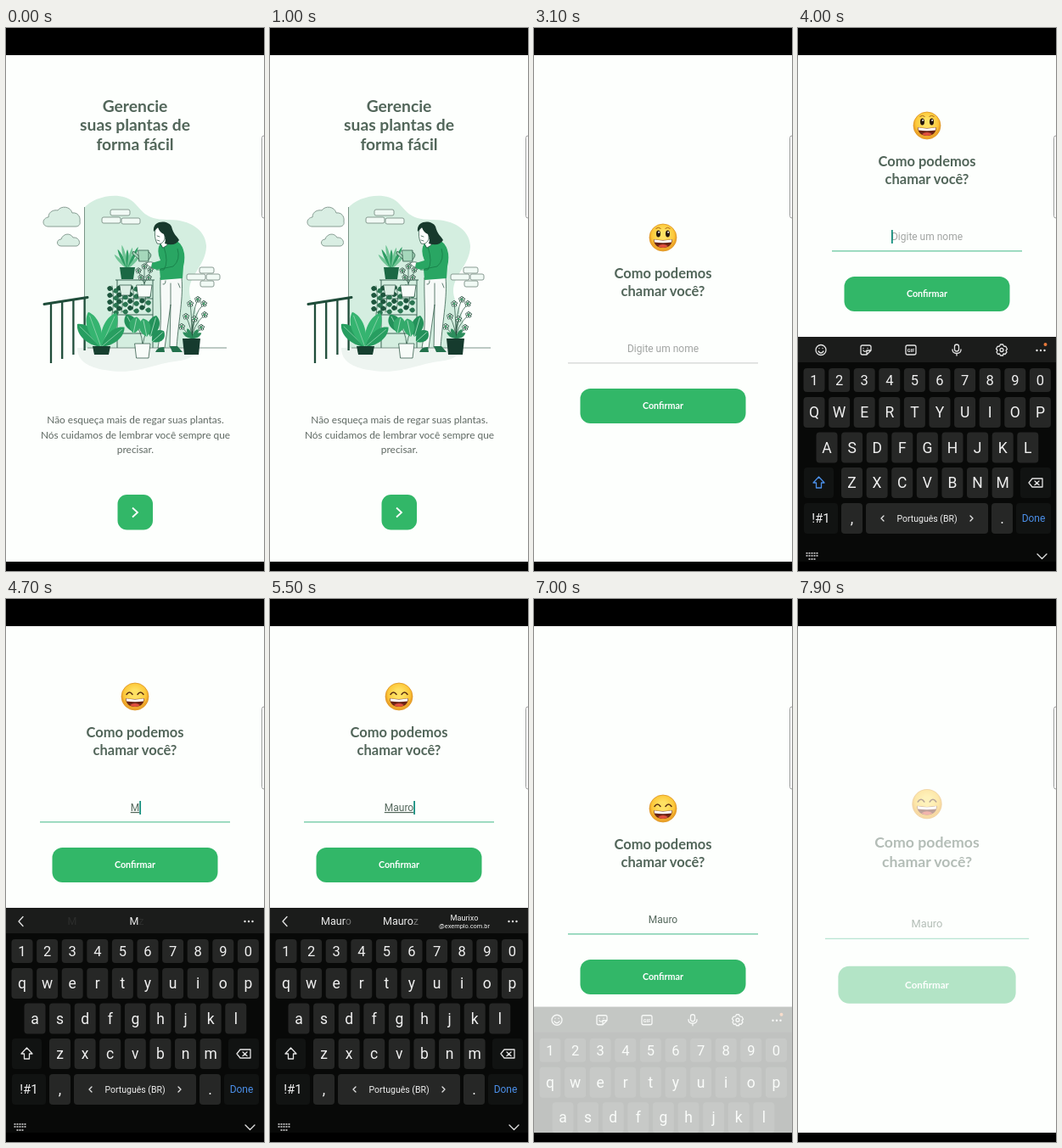
These frames come from a looping animation (304 by 640 pixels, 8000 ms). An HTML page:

```html
<!DOCTYPE html>
<html lang="pt-BR">
<head>
<meta charset="utf-8">
<style>
html, body { margin: 0; height: 100%; overflow: hidden; background: #000; }
svg { display: block; width: 100vw; height: 100vh; }
text { text-anchor: middle; font-family: Lato, sans-serif; }
.head { font-weight: 700; fill: #52665a; }
.copy { fill: #5f6963; }
.input, .keys text, .keys tspan { font-family: Roboto, sans-serif; }
.input { font-size: 12px; }
.keys text { fill: #f0f0f0; }
.icon { fill: none; stroke: #e4e4e4; stroke-width: 1.3; stroke-linecap: round; stroke-linejoin: round; }
.ink { stroke: #1f4937; stroke-width: .7; stroke-linejoin: round; stroke-linecap: round; }
</style>
</head>
<body>
<svg viewBox="0 0 304 640" id="stage"></svg>
<script>
const GREEN = '#32b768', DARK = '#17392c', NAME = 'Mauro';
const TYPED = [4680, 4860, 5040, 5220, 5400];
const FOCUS = 3700, DONE = 6850;

const text = (x, y, s, size, extra = '') =>
  `<text x="${x}" y="${y}" font-size="${size}" ${extra}>${s}</text>`;
const rect = (x, y, w, h, r, fill, extra = '') =>
  `<rect x="${x}" y="${y}" width="${w}" height="${h}" rx="${r}" fill="${fill}" ${extra}/>`;
const path = (d, fill = 'none', extra = '') => `<path d="${d}" fill="${fill}" ${extra}/>`;
const circle = (x, y, r, fill, extra = '') => `<circle cx="${x}" cy="${y}" r="${r}" fill="${fill}" ${extra}/>`;
const each = (list, draw) => list.map(draw).join('');
const ink = 'class="ink"';

// A pointed leaf growing from (x, y), tilted by a degrees
const leaf = (x, y, len, a, w, fill, vein = '') =>
  `<g transform="translate(${x} ${y}) rotate(${a})">` +
  path(`M0 0C${-w} ${-len * .35} ${-w} ${-len * .8} 0 ${-len}C${w} ${-len * .8} ${w} ${-len * .35} 0 0`, fill) +
  (vein && path(`M0 0V${-len * .9}`, 'none', `stroke="${vein}" stroke-width=".8"`)) + '</g>';
const flower = (x, y, r) => each([0, 1, 2, 3, 4], i =>
  circle(x + r * Math.sin(i * 1.257), y - r * Math.cos(i * 1.257), r * .65, '#f4fbf7', ink)) +
  circle(x, y, r * .4, GREEN);
const pot = (x, y, w, h, fill, extra = '') =>
  path(`M${x} ${y}h${w}l-2 ${h}h${4 - w}z`, fill, extra);

function garden() {
  const sky =
    path('M92 212C102 199 135 191 150 205C160 214 163 226 190 226C216 225 236 238 236 258C235 280 216 291 216 310C216 325 231 338 228 358L226 377H92Z', '#d4eee0') +
    path('M84 377H224C222 394 202 391 183 396C160 402 143 408 116 403C98 400 84 393 84 377Z', '#edf4f0') +
    path('M92.500 211V376M96 377H260', 'none', 'stroke="#6f8a7d" stroke-width=".9"') +
    path('M50 234C42 234 42 224 50 223C50 216 57 214 61 215C65 209 76 210 78 218C84 217 88 222 87 228C88 232 85 234 82 234Z', '#d9eee3', 'stroke="#7d9489" stroke-width=".9"') +
    path('M65 257C59 257 59 249 65 249C67 242 76 241 79 247C87 246 89 256 83 257Z', '#d9eee3', 'stroke="#7d9489" stroke-width=".9"') +
    each([[123, 214, 23], [113, 223, 22], [136, 224, 22], [228, 282, 17], [213, 290, 22], [236, 290, 16], [229, 298, 16]],
      ([x, y, w]) => rect(x, y, w, 7, 2, '#f1faf5', 'stroke="#7b9086" stroke-width=".9"'));

  const rail = path('M45 325.500L96 317.500', 'none', 'stroke="#1f4d3a" stroke-width="3" stroke-linecap="round"') +
    each([0, 1, 2, 3], i => path(`M${53 + 13.200 * i} ${325 - 2 * i}V${395 - 5 * i}`, 'none', 'stroke="#1f4d3a" stroke-width="2.3"'));

  const trailing = each([125, 136, 149, 163], (x, k) =>
    path(`M${x} 304Q${x + 3} 320 ${x} ${338 - k * 3}`, 'none', ink) +
    each([0, 1, 2, 3], i => {
      const y = 308 + i * 8 - k;
      return leaf(x + 1, y, 7, -75 - k * 8, 4, '#1d563d') + leaf(x + 1, y + 3, 7, 70 + i * 9, 4, '#2a7551');
    }));
  const shelf = path('M131 297V377M173 297V377M129 297H175M131 319H173M131 338H173M131 360H173', 'none', 'stroke="#3b6454" stroke-width="1"') +
    each([-42, -26, -13, 0, 13, 26, 42], (a, i) => leaf(143, 284, 23 + i % 3 * 3, a, 2.300, i % 2 ? '#2d9d63' : '#71c596')) +
    pot(134, 282, 18, 14, '#1b6844') + trailing +
    path('M163 304V284M163 301L156 287M163 301L171 286', 'none', ink) +
    each([[156, 286], [163, 281], [170, 285], [159, 294], [168, 294]], ([x, y]) => flower(x, y, 2)) +
    pot(154, 303, 18, 14, '#f8fcf9', ink) + pot(134, 303, 14, 12, '#dceee4', ink);

  const monstera = path('M161 374Q160 355 150 348M161 374Q164 355 172 348', 'none', ink) +
    each([[153, 359, 24, -28], [150, 360, 20, 12], [170, 364, 26, 16], [166, 364, 22, -12], [172, 370, 19, 48]],
      ([x, y, l, a], i) => leaf(x, y, l, a, 9, i % 2 ? '#34aa6b' : '#23915a', '#a9dfc1')) +
    pot(152, 372, 18, 17, '#f8fcf9', ink);

  const broad = each([[-46, 39, 10], [-20, 44, 10], [24, 44, 10], [50, 36, 9]],
    ([a, l, w], i) => leaf(112, 376, l, a, w, i % 3 ? '#35b470' : '#279e60', '#8bd2aa')) +
    pot(102, 375, 21, 10, '#163f2f');

  const blooms = [[226, 320], [217, 325], [233, 325], [212, 340], [222, 343], [234, 338], [230, 353], [207, 352]];
  const tall = path(blooms.map(([x, y]) => `M219 367Q219 ${y + 14} ${x} ${y}`).join(''), 'none', ink) +
    each(blooms, ([x, y]) => flower(x, y, 2.200)) +
    each([-55, -25, 35, 60], a => leaf(219, 366, 13, a, 3, '#2c8d5c')) +
    pot(208, 366, 21, 19, '#163b2e');

  const woman =
    path('M182 295L207 294C209 318 204 340 201 376H193L194 326L187 377H179C185 347 181 320 182 295Z', '#f7faf8', ink) +
    path('M194 301V326M185 302Q188 303 188 298M203 301L205 306', 'none', ink) +
    path('M176 382Q178 376 186 376L187 382ZM193 375H202L208 382H196Z', '#22714c') +
    path('M156 262H168V275H157ZM156 268L150 263L149 266L157 273M168 264Q174 267 168 273', '#a5d7bb', ink) +
    path('M165 277Q171 274 176 278L174 283Q168 282 165 277Z', '#fff', ink) +
    path('M183 251Q198 247 205 254Q213 264 209 281L208 295L182 297L181 284Q176 286 171 282L172 277L182 274Q178 265 180 258Z', '#29a663') +
    path('M186 258Q192 276 186 285L177 285M202 260Q206 273 197 281L182 284', 'none', 'stroke="#167a46" stroke-width=".8"') +
    path('M181 252L184 248H190V256L185 259Z', '#fff', ink) +
    path('M176 237Q174 246 178 254Q184 256 187 249V235H179Z', '#fff', ink) +
    path('M174 240C172 226 191 226 195 234C197 243 202 246 204 250Q199 258 187 254Q189 249 186 243Q181 241 179 235Z', DARK) +
    path('M178 245L181 246M178 250L181 251', 'none', ink);
  return sky + rail + shelf + tall + woman + monstera + broad;
}

function face() {
  return circle(152, 247, 16, 'url(#sun)', 'stroke="#d98b18" stroke-width=".7"') +
    path('M141 249Q152 251 163 249C163 255 159 259 152 259S141 255 141 249Z', '#6b2415') +
    path('M146 257Q152 253 158 257Q152 261 146 257Z', '#e2503f') +
    path('M141.500 249.300Q152 251.500 162.500 249.300L162 252.500Q152 254 142 252.500Z', '#fff') +
    '<g id="open">' + each([146.500, 157.500], x =>
      `<ellipse cx="${x}" cy="242.500" rx="2.500" ry="4" fill="#24160d"/>` + circle(x + .6, 240.800, 1, '#fff') +
      path(`M${x - 3} 236.500Q${x} 234 ${x + 3} 236.500`, 'none', 'stroke="#a8661a" stroke-width="1"')) + '</g>' +
    '<g id="smile">' + each([145.500, 158.500], x =>
      path(`M${x - 3.500} 244.500Q${x} 239.500 ${x + 3.500} 244.500`, 'none', 'stroke="#5c3013" stroke-width="1.5" stroke-linecap="round"')) + '</g>';
}

function keyboard() {
  const key = (cx, y, w, h, label, size = 17.500, fill = '#262726', extra = '') =>
    rect(cx - w / 2, y, w, h, 4, fill) + text(cx, y + h / 2 + size * .35, label, size, extra);
  const row = (chars, x, y, h, size) => each([...chars], (c, i) => key(x + 29.600 * i, y, 25, h, c, size, '#262726', /\d/.test(c) ? '' : 'class="letter"'));
  const icon = (d, extra = '') => path(d, 'none', 'class="icon" ' + extra);
  const ring = (x, y, r) => circle(x, y, r, 'none', 'class="icon"');
  return rect(0, 364, 304, 276, 0, '#080908') + rect(0, 364, 304, 30, 0, '#1b1c1b') +
    '<g id="tools">' +
    ring(27, 379.500, 6) + icon('M24 381Q27 385 30 381M25 377.500v.1M29 377.500v.1') +
    icon('M76 374H84Q86 374 86 376V380L81 385H76Q74 385 74 383V376Q74 374 76 374M81 385V380H86M77 377.500v.1M82 377.500v.1M77 380Q78 382 80 381') +
    rect(127, 374, 12, 11, 2, 'none', 'class="icon"') + text(133, 382, 'GIF', 5.500, 'font-weight="700"') +
    rect(184.500, 373, 5, 8, 2.500, 'none', 'class="icon"') + icon('M182 379Q182 383.500 187 383.500T192 379M187 383.500V386') +
    icon('M238.500 373H241.500L242.500 375L245 375.500L246.500 378.500L245 380L246 382L244 384.500L242 384L241.500 386H238.500L237.500 384L235.500 384.500L234 382L235 380L233.500 378L235 375.500L237.500 375Z') + ring(240, 379.500, 2) +
    circle(291.500, 373, 2, '#e8793a') + '</g>' +
    '<g id="hints">' + icon('M20 374.500L15 380L20 385.500') +
    each([78, 154], x => `<text x="${x}" y="384" font-size="12.500"><tspan></tspan><tspan></tspan></text>`) +
    '<g id="mail">' + text(229, 379, 'Maurixo', 9.200) + text(229, 388, '@exemplo.com.br', 7.400) + '</g></g>' +
    each([281.500, 286, 290.500], x => circle(x, 380, 1.200, '#e4e4e4')) +
    row('1234567890', 19, 401, 28, 16.500) + row('QWERTYUIOP', 19, 435, 36) +
    row('ASDFGHJKL', 34, 476.500, 36) + row('ZXCVBNM', 63.500, 518, 36) +
    rect(7, 518, 35, 36, 4, '#111312') + icon('M24.500 529L31 536H27.500V542H21.500V536H18Z', 'id="shift"') +
    rect(262, 518, 36, 36, 4, '#111312') + icon('M272 536L276 531H288V541H276ZM279 534L284 538.500M284 534L279 538.500') +
    key(27, 560, 40, 36, '!#1', 15, '#111312') + key(63.500, 560, 25, 36, ',') +
    key(152, 560, 144, 36, 'Português (BR)', 10.500) + icon('M101 575L98 578L101 581M203 575L206 578L203 581') +
    key(240.500, 560, 25, 36, '.') + key(277.500, 560, 41, 36, 'Done', 12, '#111312', 'style="fill:#4b8fe8"') +
    icon('M10 619H24M10 622H24M13 626H21', 'stroke-dasharray="1 2"') + icon('M282 620L287.500 625.500L293 620');
}

const $ = id => document.getElementById(id);
$('stage').innerHTML =
  '<defs><radialGradient id="sun" cy=".4"><stop offset=".3" stop-color="#ffe163"/><stop offset=".8" stop-color="#fcc83a"/><stop offset="1" stop-color="#eea62a"/></radialGradient></defs>' +
  rect(0, 32, 304, 597, 0, '#fdfffd') +
  '<g id="welcome">' +
  each(['Gerencie', 'suas plantas de', 'forma fácil'], (s, i) => text(152, 98.500 + 22.800 * i, s, 19.300, 'class="head"')) +
  garden() +
  each(['Não esqueça mais de regar suas plantas.', 'Nós cuidamos de lembrar você sempre que', 'precisar.'],
    (s, i) => text(152.500, 466.300 + 17.300 * i, s, 11.900, 'class="copy"')) +
  '<g id="next">' + rect(131.500, 550, 41.500, 41.500, 11, GREEN) +
  path('M149 565.500L155 571L149 576.500', 'none', 'stroke="#fff" stroke-width="1.8"') + '</g></g>' +
  '<g id="ask"><g id="form">' + face() +
  text(152, 295, 'Como podemos', 16.500, 'class="head"') + text(152, 316.500, 'chamar você?', 16.500, 'class="head"') +
  '<text id="name" class="input" x="152" y="382"></text>' + rect(0, 370, 1.800, 16, 0, '#16907f', 'id="caret"') +
  rect(40, 394.300, 224, 1.200, 0, '#cfd2d0', 'id="line"') +
  '<g id="confirm">' + rect(54.500, 425, 195, 41, 12, GREEN) + text(152, 449.500, 'Confirmar', 10.800, 'fill="#fff" font-weight="700"') + '</g></g></g>' +
  '<g id="keys" class="keys">' + keyboard() + '</g>' +
  rect(0, 0, 304, 32, 0, '#000') + rect(0, 629, 304, 11, 0, '#000') +
  rect(301.500, 127, 8, 97, 2.500, '#fff', 'stroke="#9b9d9c" stroke-width="1"');

const letters = [...document.querySelectorAll('.letter')];
const hints = [...document.querySelectorAll('#hints > text')];
const clamp = v => Math.max(0, Math.min(1, v));
const show = (id, on) => $(id).style.display = on ? '' : 'none';
const attr = (id, name, v) => $(id).setAttribute(name, v);

// Quick start, long settle
const zoomEase = p => p < 1 / 6 ? .4 * Math.pow(p * 6, 2.200) : 1 - .6 * Math.exp((1 / 6 - p) / .07);
const zoom = (t, start) => ({ e: zoomEase(clamp((t - start) / 450)), a: clamp((t - start - 40) / 70) });

function place(id, scale, alpha) {
  attr(id, 'transform', `translate(152 320) scale(${scale}) translate(-152 -320)`);
  attr(id, 'opacity', alpha);
}

function draw(t) {
  const enter = zoom(t, 2337), leave = zoom(t, 7821);
  place('welcome', 1 + .15 * enter.e, 1 - enter.a);
  place('ask', .85 + .15 * enter.e + .15 * leave.e, enter.a * (1 - leave.a));
  attr('next', 'opacity', t > 2250 ? .8 : 1);
  attr('confirm', 'opacity', t > 7720 ? .85 : 1);

  const count = TYPED.filter(s => t >= s).length;
  const word = NAME.slice(0, count);
  const focused = t >= FOCUS && t < DONE;
  const last = count ? TYPED[count - 1] : FOCUS;
  const label = $('name');
  label.textContent = word || 'Digite um nome';
  label.style.fill = word ? '#52665a' : '#a2a5a3';
  label.style.textDecoration = word && focused ? 'underline' : 'none';
  const half = label.getComputedTextLength() / 2;
  attr('caret', 'x', count ? 152 + half : 152 - half);
  show('caret', focused && (t - last) % 1000 < 500);
  attr('line', 'fill', t >= FOCUS ? '#5fc39a' : '#cfd2d0');
  show('open', !count);
  show('smile', count);
  attr('form', 'transform', `translate(0 ${t >= 3860 && t < 6900 ? -132 : 0})`);

  const k = t < DONE ? clamp((t - 3720) / 200) : clamp(1 - (t - DONE) / 300);
  attr('keys', 'transform', `translate(0 ${232 * (1 - k)})`);
  attr('keys', 'opacity', k * k);
  const hinting = count > 0 && focused;
  show('tools', !hinting);
  show('hints', hinting);
  show('mail', count > 2);
  hints.forEach((h, i) => {
    const s = i ? word + 'z' : word;
    h.children[0].textContent = s.slice(0, -1);
    h.children[1].textContent = s.slice(-1);
    h.children[1].style.fillOpacity = clamp((t - last) / 250);
  });
  letters.forEach(l => l.textContent = count ? l.textContent.toLowerCase() : l.textContent.toUpperCase());
  $('shift').style.stroke = count ? '#e4e4e4' : '#4b8fe8';
}

function tick() {
  draw(performance.now() % 8000);
  requestAnimationFrame(tick);
}
tick();
</script>
</body>
</html>
```
